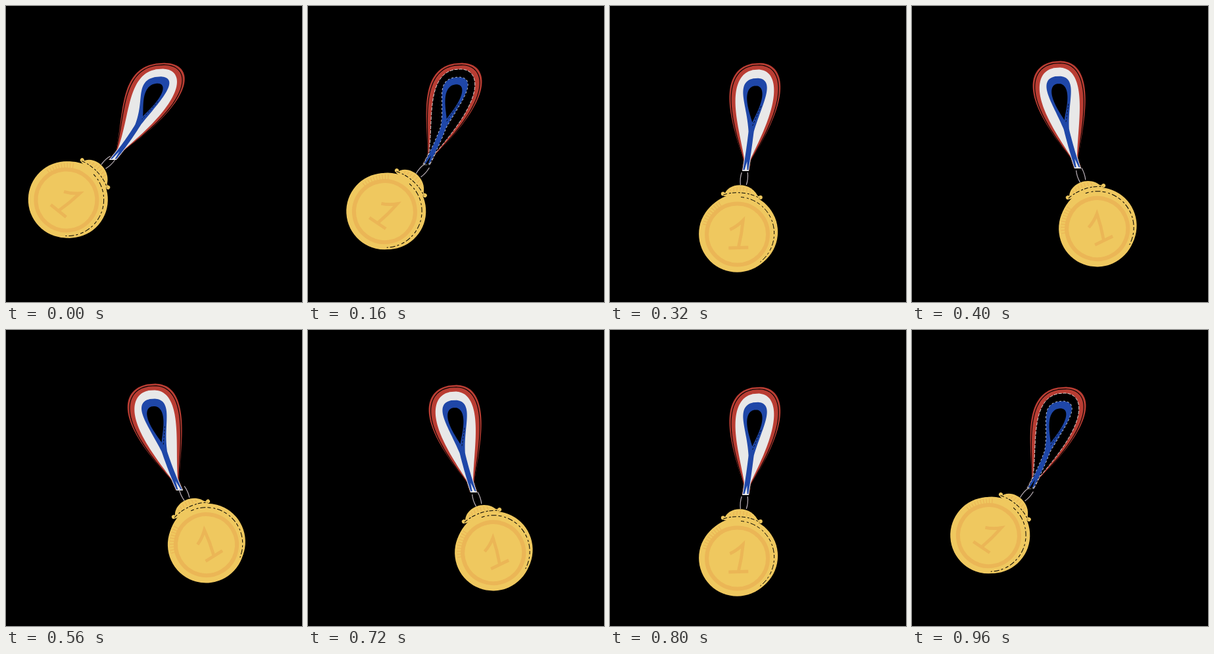
Recreate the animation shown at these times as an HTML page with a canvas. Size 450x450 px, loop 1.04 s.

```html
<!DOCTYPE html>
<html>
<head>
<meta charset="utf-8">
<title>Swinging medal</title>
<style>
html, body { margin: 0; width: 100%; height: 100%; overflow: hidden; background: #000; }
canvas { display: block; }
</style>
</head>
<body>
<canvas id="stage" width="450" height="450"></canvas>
<script>
const ctx = document.getElementById('stage').getContext('2d');
const RED = '#b93d33', WHITE = '#e8e8e8', BLUE = '#1f47a8';
const GOLD = '#efc85f', AMBER = '#ebb656', BLACK = '#000', STEEL = '#bdb3ba';
const LOOP = 1040;
const TURN = Math.PI * 2;
const rad = deg => deg * Math.PI / 180;

// The ribbon hangs from top to knot; the medal turns by tilt around its centre.
const farLeft = { top: [234, 87], knot: [162, 234], medal: [94.5, 294.5], tilt: 41 };
const left = { top: [228, 87], knot: [180, 241], medal: [119, 312], tilt: 36, hollow: true };
const middle = { top: [222, 87], knot: [206, 251], medal: [195.3, 345], tilt: 0 };
const right = { top: [220, 84], knot: [252, 247], medal: [282.5, 336], tilt: -24 };
const farRight = { top: [221, 82], knot: [264, 244], medal: [305, 324], tilt: -30 };

const timeline = [
  [0, farLeft], [160, left], [320, middle], [400, right],
  [560, farRight], [720, right], [800, middle], [960, left]
];

// Teardrops: start and end along the ribbon, half width, taper, half width of the foot
const RED_BAND = { from: 0, to: 1, half: 38.5, taper: 1.5, foot: 6 };
const INSET = { from: 0.019, to: 1, half: 35.7, taper: 1.5, foot: 5.5 };
const WHITE_BAND = { from: 0.06, to: 1, half: 29, taper: 1.7, foot: 5 };
const BLUE_BAND = { from: 0.14, to: 0.99, half: 18, taper: 5, foot: 4 };
const HOLE = { from: 0.21, to: 0.55, half: 11.5, taper: 1.4, foot: 0 };

function fill(path, color) {
  ctx.fillStyle = color;
  ctx.fill(path);
}

function stroke(path, color, width, dash = []) {
  ctx.strokeStyle = color;
  ctx.lineWidth = width;
  ctx.setLineDash(dash);
  ctx.stroke(path);
  ctx.setLineDash([]);
}

function disc(x, y, r, color) {
  const path = new Path2D();
  path.arc(x, y, r, 0, TURN);
  fill(path, color);
}

function polygon(points) {
  const path = new Path2D();
  points.forEach(p => path.lineTo(...p));
  return path;
}

// Maps a distance down the ribbon and an offset across it to the stage.
function hang({ top, knot }) {
  const dx = knot[0] - top[0], dy = knot[1] - top[1];
  const widen = 1 + 0.5 * (dx / dy) ** 2;
  return (down, across) => {
    const a = across * widen;
    return [top[0] + dx * down ** 1.7 + a, top[1] + dy * down - 0.08 * a * (1 - down)];
  };
}

function teardrop(place, { from, to, half, taper, foot }) {
  const shape = a => Math.abs(Math.sin(a)) ** 0.85 * Math.sin(a / 2) ** taper;
  const peak = shape(2 * Math.asin(Math.sqrt((taper + 0.85) / (taper + 1.7))));
  const points = [];
  for (let i = 0; i <= 120; i++) {
    const a = i / 120 * TURN;
    const down = from + (to - from) * (1 + Math.cos(a)) / 2;
    const width = Math.max(half * shape(a) / peak, foot);
    points.push(place(down, a < Math.PI ? width : -width));
  }
  const path = polygon(points);
  path.closePath();
  return path;
}

function drawRibbon(pose) {
  const place = hang(pose);
  const cloth = pose.hollow ? BLACK : WHITE;
  const inner = teardrop(place, WHITE_BAND);
  const band = teardrop(place, BLUE_BAND);

  fill(teardrop(place, RED_BAND), RED);
  stroke(teardrop(place, INSET), BLACK, 1.1);
  fill(inner, cloth);
  if (pose.hollow) {
    stroke(inner, WHITE, 0.9, [5, 2]);
    stroke(band, WHITE, 1.4, [3, 3]);
  }
  fill(band, BLUE);
  fill(teardrop(place, HOLE), BLACK);
  stroke(polygon([place(0.4, 11), place(0.58, 1)]), BLACK, 0.8, [3, 2]);
  fill(polygon([place(0.91, 0), place(1, -2), place(1, 2.5)]), cloth);
}

function drawLoop() {
  const wires = new Path2D();
  wires.moveTo(5, -92);
  wires.quadraticCurveTo(2, -84, 3, -73);
  wires.moveTo(14, -92);
  wires.quadraticCurveTo(15, -82, 12, -73);
  stroke(wires, STEEL, 1.2);
}

function drawCap() {
  const dome = new Path2D();
  dome.moveTo(-22, -56);
  dome.bezierCurveTo(-18, -78, 22, -80, 31, -52);
  fill(dome, GOLD);
  disc(-23.5, -59.5, 3, GOLD);
  disc(33.5, -54, 3, GOLD);

  const ticks = new Path2D();
  for (let x = -12; x <= 18; x += 5) {
    const y = -70 + (x - 3) ** 2 * 0.018;
    ticks.moveTo(x, y);
    ticks.lineTo(x - 0.5, y + 6);
  }
  stroke(ticks, AMBER, 1.3);
}

function drawRim() {
  const rim = new Path2D();
  rim.moveTo(-23, -58);
  rim.bezierCurveTo(-8, -63, 14, -63, 32, -53);
  stroke(rim, GOLD, 4);
  stroke(rim, BLACK, 1, [6, 3, 3, 2]);

  const hatch = new Path2D();
  for (let a = 194; a <= 242; a += 4.8) {
    const c = Math.cos(rad(a)), s = Math.sin(rad(a));
    hatch.moveTo(c * 48, s * 48);
    hatch.lineTo(c * 56, s * 56);
  }
  stroke(hatch, AMBER, 1.2);

  const crack = new Path2D();
  crack.arc(-1, 0.6, 55.3, rad(-85), rad(52));
  stroke(crack, BLACK, 1, [5, 4, 3, 3, 8, 3]);
}

function drawFace() {
  const ring = new Path2D();
  ring.arc(-1.7, 2, 46.5, 0, TURN);
  stroke(ring, AMBER, 6);

  const one = new Path2D();
  one.moveTo(-13, -5);
  one.quadraticCurveTo(-2, -10, 7, -19);
  one.quadraticCurveTo(5, 2, 0, 22);
  one.moveTo(-15, 23);
  one.lineTo(15, 22);
  stroke(one, AMBER, 4.8);
}

function drawMedal({ medal, tilt }) {
  ctx.save();
  ctx.translate(...medal);
  ctx.rotate(rad(tilt));
  drawLoop();
  drawCap();
  disc(1.6, -1.4, 58.2, GOLD);
  disc(-2, 1.6, 58.2, GOLD);
  drawRim();
  drawFace();
  ctx.restore();
}

function draw(time) {
  const t = time % LOOP;
  const [, pose] = timeline.filter(([start]) => start <= t).pop();
  ctx.fillStyle = BLACK;
  ctx.fillRect(0, 0, 450, 450);
  drawRibbon(pose);
  drawMedal(pose);
}

const begin = performance.now();
function tick() {
  draw(Math.max(0, performance.now() - begin));
  requestAnimationFrame(tick);
}
tick();
</script>
</body>
</html>
```
